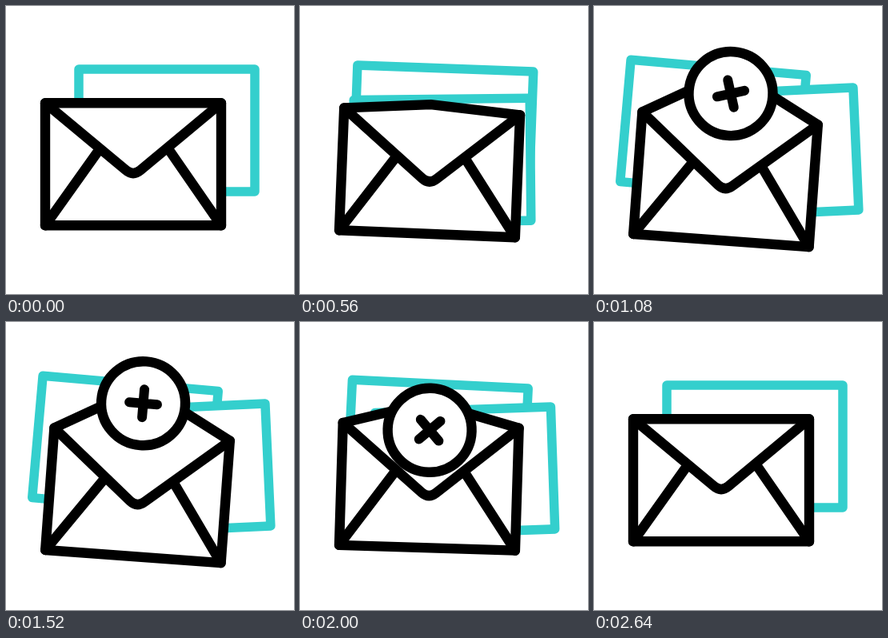
Animation of 360x360 px, one loop 2800 ms. Source, as an HTML page:

```html
<!DOCTYPE html>
<html lang="en">
<head>
<meta charset="utf-8">
<title>Envelope</title>
<style>
  html, body { margin: 0; width: 100%; height: 100%; overflow: hidden; background: #fff; }
  svg { display: block; width: 100%; height: 100%; }
  .card { fill: #fff; stroke: #34cfcd; stroke-width: 11.5; stroke-linejoin: round; }
  .ink { fill: #fff; stroke: #000; stroke-width: 12.4; stroke-linejoin: round; stroke-linecap: round; }
  .line { fill: none; }
  #plus { stroke-width: 12; }
</style>
</head>
<body>
<svg viewBox="0 0 360 360">
  <defs>
    <clipPath id="mouth">
      <path d="M-110-76.5L-9 7.5Q0 15 9 7.5L110-76.5V-300H-110Z"/>
    </clipPath>
  </defs>
  <rect id="cardA" class="card" x="-110" y="-76.5" width="220" height="153"/>
  <rect id="cardB" class="card" x="-110" y="-76.5" width="220" height="153"/>
  <g id="envelope">
    <path id="body" class="ink"/>
    <g clip-path="url(#mouth)">
      <g id="badge">
        <circle class="ink" r="52.5"/>
        <path id="plus" class="ink line" d="M-17.5 0H17.5M0-17.5V17.5"/>
      </g>
    </g>
    <path class="ink line" d="M-110-76.5L-9 7.5Q0 15 9 7.5L110-76.5M-110 76.5L-42-19M110 76.5L44-19"/>
  </g>
</svg>
<script>
const LOOP = 2800;
const el = id => document.getElementById(id);
const [cardA, cardB, envelope, body, badge, plus] =
  ['cardA', 'cardB', 'envelope', 'body', 'badge', 'plus'].map(el);

const span = (t, from, to) => Math.min(1, Math.max(0, (t - from) / (to - from)));
const smooth = p => p * p * (3 - 2 * p);
const quad = p => p < 0.5 ? 2 * p * p : 1 - 2 * (1 - p) ** 2;
const mix = (a, b, k) => a + (b - a) * k;

// 0 -> 1 over the first interval, back to 0 over the second
const swing = (t, a, b, c, d) => smooth(span(t, a, b)) - smooth(span(t, c, d));

function place(node, x, y, angle = 0) {
  node.setAttribute('transform', `translate(${x} ${y}) rotate(${angle})`);
}

function draw(t) {
  const a = swing(t, 342, 830, 1765, 2283);
  place(cardA, mix(201, 149, a), mix(155.5, 153, a), 5 * a);

  const b = swing(t, 380, 855, 1820, 2460);
  place(cardB, mix(159, 217.5, b), mix(197.5, 183.5, b), -2.6 * b ** 1.3);

  const e = swing(t, 240, 840, 1717, 2231);
  place(envelope, mix(159, 164.5, e), mix(197.8, 216.8, e), 4.2 * e);

  // the flap closes with a long tail
  const shut = smooth(1 - (1 - span(t, 1710, 2640)) ** 1.9);
  const flap = smooth(span(t, 425, 995)) - shut;
  body.setAttribute('d', `M-110 76.5V-76.5L-2 ${-76.5 - 60 * flap}L110-76.5V76.5Z`);

  const rise = swing(t, 290, 1180, 1796, 2520);
  place(badge, -1.4, mix(114, -115.3, rise));

  const turn = smooth(span(t, 240, 1275)) + quad(span(t, 1460, 2940));
  place(plus, 0, 0, 180 * turn);
}

function tick(now) {
  draw(now % LOOP);
  requestAnimationFrame(tick);
}
draw(0);
requestAnimationFrame(tick);
</script>
</body>
</html>
```
